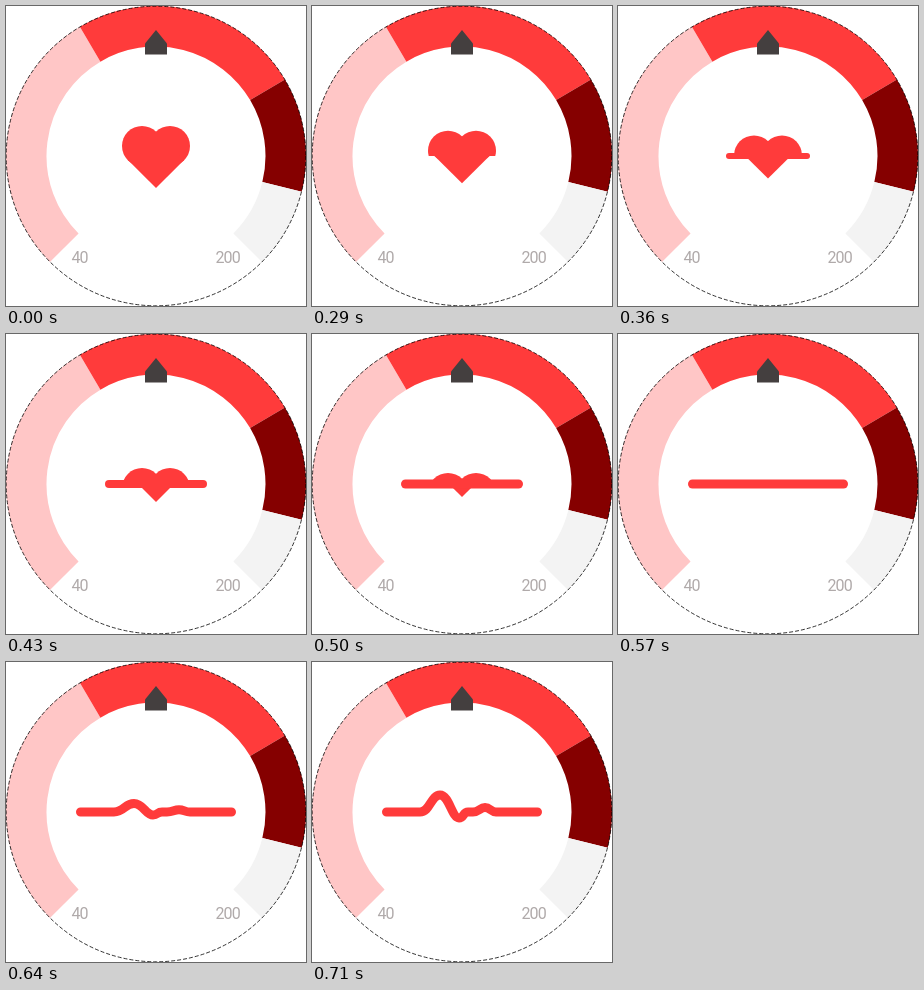
These frames come from a looping animation (300 by 300 pixels, 780 ms). An HTML page:

```html
<!DOCTYPE html>
<html lang="en">
<head>
<meta charset="utf-8">
<title>Heart rate gauge</title>
<style>
  html, body { margin: 0; width: 100%; height: 100%; overflow: hidden; background: #fff; }
  svg { display: block; width: 100vw; height: 100vh; }
  text { font: 400 16px Roboto, sans-serif; letter-spacing: -.9px; fill: #b0aaaa; }
  .red { fill: #ff3b3b; }
  #trace { fill: none; stroke: #ff3b3b; stroke-linecap: round; stroke-linejoin: round; }
</style>
</head>
<body>
<svg viewBox="0 0 300 300">
  <defs>
    <clipPath id="above"><rect width="300" height="150"/></clipPath>
    <clipPath id="below"><rect y="150" width="300" height="150"/></clipPath>
    <g id="shape">
      <circle cx="136" cy="140" r="20"/>
      <circle cx="164" cy="140" r="20"/>
      <path d="M150 125.7L178.1 154.1L150 182L121.9 154.1Z"/>
    </g>
  </defs>
  <g id="gauge" fill="none" stroke-width="40.5"></g>
  <circle cx="150" cy="150" r="149.8" fill="none" stroke="#000" stroke-width=".8" stroke-dasharray="4 2"/>
  <path d="M150 24L161 37.5V48.6H139V37.5Z" fill="#443f3f"/>
  <text x="65.5" y="256.5">40</text>
  <text x="209.5" y="256.5">200</text>
  <g id="heart" class="red">
    <g clip-path="url(#above)"><use id="lobes" href="#shape"/></g>
    <g clip-path="url(#below)"><use id="tip" href="#shape"/></g>
  </g>
  <path id="trace"/>
</svg>
<script>
const LOOP = 780;
const find = id => document.getElementById(id);
const heart = find('heart'), lobes = find('lobes'), tip = find('tip'), trace = find('trace');

// [start angle, end angle, colour]
const bands = [
  [135, 239.5, '#ffc6c6'],
  [239.5, 329.3, '#ff3b3b'],
  [329.3, 373.8, '#850000'],
  [373.8, 405, '#f3f3f3']
];

function bandPath(from, to) {
  const radius = 129.75;
  const point = deg => {
    const a = deg * Math.PI / 180;
    return `${150 + radius * Math.cos(a)} ${150 + radius * Math.sin(a)}`;
  };
  return `M${point(from)}A${radius} ${radius} 0 0 1 ${point(to)}`;
}

find('gauge').innerHTML = bands.map(([from, to, colour]) =>
  `<path d="${bandPath(from, to)}" stroke="${colour}"/>`).join('');

// sink: how far the heart halves close on the line (null hides them)
const steps = [
  { at: 0,   sink: 0,    half: 0,  weight: 0, beat: 0 },
  { at: 290, sink: 4.7,  half: 34, weight: 0, beat: 0 },
  { at: 360, sink: 9.4,  half: 42, weight: 6, beat: 0 },
  { at: 430, sink: 14.1, half: 51, weight: 8, beat: 0 },
  { at: 500, sink: 19,   half: 61, weight: 9, beat: 0 },
  { at: 570, sink: null, half: 80, weight: 9, beat: 0 },
  { at: 640, sink: null, half: 80, weight: 9, beat: 0.5 },
  { at: 710, sink: null, half: 80, weight: 9, beat: 1 }
];

function tracePath(half, weight, beat) {
  const reach = half - weight / 2;
  const left = 150 - reach, right = 150 + reach;
  if (!beat) return `M${left} 150H${right}`;
  const peak = 150 - 17 * beat, dip = 150 + 6 * beat, bump = 150 - 4.5 * beat;
  return `M${left} 150H108C118 150 119 ${peak} 128 ${peak}` +
    `C137 ${peak} 140 ${dip} 147 ${dip}C152 ${dip} 151 150 156 150` +
    `H161C167 150 168 ${bump} 173 ${bump}S179 150 184 150H${right}`;
}

let shown;
function draw() {
  const time = performance.now() % LOOP;
  const step = steps.findLast(s => s.at <= time);
  if (step !== shown) {
    shown = step;
    const { sink, half, weight, beat } = step;
    heart.style.display = sink === null ? 'none' : '';
    lobes.setAttribute('transform', `translate(0 ${sink || 0})`);
    tip.setAttribute('transform', `translate(0 ${-(sink || 0)})`);
    trace.style.display = weight ? '' : 'none';
    trace.setAttribute('stroke-width', weight);
    trace.setAttribute('d', tracePath(half, weight, beat));
  }
  requestAnimationFrame(draw);
}
draw();
</script>
</body>
</html>
```
